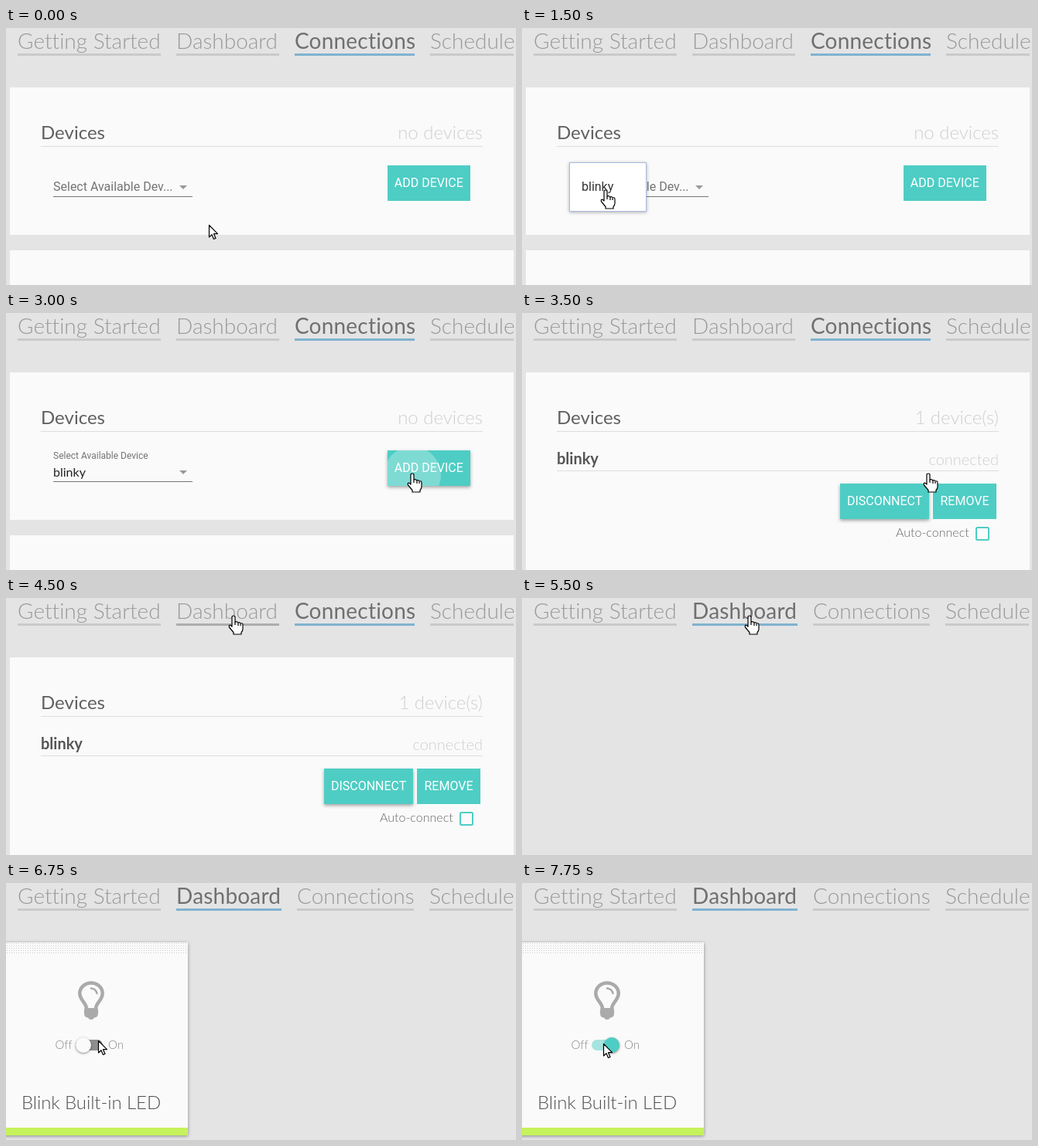
Animation of 659 by 333 pixels, one loop 8 s. Source, as an HTML page:

```html
<!DOCTYPE html>
<html lang="en">
<head>
<meta charset="utf-8">
<style>
  html, body { margin: 0; width: 100%; height: 100%; overflow: hidden; background: #e4e4e4; }
  svg { display: block; width: 659px; height: 333px; font-family: Lato, sans-serif; font-variant-ligatures: none; }
  .thin { font-weight: 300; }
  .nav text { font-size: 28px; font-weight: 300; fill: #999; }
  .nav rect { fill: #cacaca; }
  .nav .on text { font-weight: 400; fill: #707070; letter-spacing: .2px; }
  .nav .on rect { fill: #7fb2d0; }
  .nav .hover rect { fill: #adadad; }
  .roboto { font-family: Roboto, sans-serif; font-size: 16px; }
  .btn text { font: 16px Roboto, sans-serif; fill: #fff; text-anchor: middle; }
  .btn rect { fill: #4ecdc4; }
  .raised rect { filter: drop-shadow(0 2px 2px rgba(0,0,0,.35)); }
  .end { text-anchor: end; font-weight: 300; fill: #cfcfcf; }
  .cursor path { fill: #fff; stroke: #000; stroke-width: 1.2; stroke-linejoin: round; }
</style>
</head>
<body>
<svg viewBox="0 0 659 333">
  <defs>
    <pattern id="dots" width="3" height="3" y="77" patternUnits="userSpaceOnUse">
      <path d="M1 1h1v1h-1z" fill="#cdcdcd"/>
    </pattern>
    <clipPath id="addClip"><rect x="493" y="178" width="107" height="46"/></clipPath>
  </defs>
  <rect width="659" height="333" fill="#e4e4e4"/>
  <g class="nav" id="nav"></g>

  <g id="connections">
    <rect id="panel" x="5" y="77" width="651" fill="#fafafa"/>
    <text x="45" y="144" font-size="24" fill="#606060">Devices</text>
    <text id="count" class="end" x="616" y="144" font-size="24"></text>
    <path d="M45 153.5H616" stroke="#dedede"/>

    <g id="form">
      <rect x="5" y="288" width="651" height="45" fill="#fafafa"/>
      <text id="prompt" class="roboto" x="61" y="211" fill="#757575">Select Available Dev...</text>
      <g id="chosen">
        <text class="roboto" x="61" y="189" style="font-size:12px" fill="#757575">Select Available Device</text>
        <text x="61" y="212" font-size="16" fill="#222">blinky</text>
      </g>
      <path d="M61 218.5H241" stroke="#757575"/>
      <path d="M224 204h10l-5 5z" fill="#999"/>
      <g class="btn" id="add">
        <rect x="493" y="178" width="107" height="46"/>
        <circle id="ripple" cx="525" cy="210" fill="#fff" clip-path="url(#addClip)"/>
        <text x="546.3" y="206">ADD DEVICE</text>
      </g>
      <g id="popup">
        <rect x="61.5" y="174.5" width="99" height="63" fill="#fff" stroke="#a9bbe2"
              style="filter:drop-shadow(0 1px 2px rgba(0,0,0,.3))"/>
        <text class="roboto" x="77" y="211" fill="#333">blinky</text>
      </g>
    </g>

    <g id="device">
      <text x="45" y="196" font-size="20" font-weight="700" fill="#555">blinky</text>
      <text class="end" x="616" y="197" font-size="20">connected</text>
      <path d="M45 204.5H616" stroke="#dedede"/>
      <g class="btn raised">
        <rect x="411" y="221" width="115" height="46"/>
        <text x="468.6" y="249">DISCONNECT</text>
      </g>
      <g class="btn">
        <rect x="531" y="221" width="82" height="46"/>
        <text x="572" y="249">REMOVE</text>
      </g>
      <text class="thin" x="483" y="290" font-size="16" fill="#666">Auto-connect</text>
      <rect x="587" y="278" width="16" height="16" rx="1.5" fill="none" stroke="#4ecdc4" stroke-width="2"/>
    </g>
  </g>

  <g id="card">
    <rect x="-5" y="77" width="240" height="250" fill="#fafafa" style="filter:drop-shadow(0 1px 2px rgba(0,0,0,.4))"/>
    <rect y="77" width="235" height="15" fill="url(#dots)"/>
    <rect y="317" width="235" height="10" fill="#c6f25c"/>
    <g fill="none" stroke="#aaa" stroke-linecap="round">
      <path stroke-width="4.5" d="M104 163C104 155 95.3 152 95.3 143A14.7 13.6 0 0 1 124.7 143C124.7 152 116 155 116 163"/>
      <path stroke-width="2.5" d="M110 136.5Q116 137 117.5 143"/>
      <path fill="#aaa" stroke="none" d="M101.5 162H118.5Q120 167 118.5 172Q117 174.5 114 174.5Q113 177 110 177Q107 177 106 174.5Q103 174.5 101.5 172Q100 167 101.5 162Z"/>
    </g>
    <g class="thin" font-size="15" fill="#888">
      <text x="63.5" y="215">Off</text>
      <text x="132" y="215">On</text>
    </g>
    <rect id="track" x="90" y="203" width="35" height="14" rx="7"/>
    <circle id="thumb" cy="210" r="10" style="filter:drop-shadow(0 1px 1.5px rgba(0,0,0,.45))"/>
    <text class="thin" x="110" y="293" font-size="24" letter-spacing="-.1" text-anchor="middle" fill="#505050">Blink Built-in LED</text>
  </g>

  <g class="cursor" id="cursor">
    <path id="arrow" d="M.5 .5V16L4 12.7L6.5 18.5L9 17.5L6.5 11.7H11.5Z"/>
    <g id="hand">
      <path d="M-4 14V2Q-4 0 -2 0Q0 0 0 2V8Q2.5 7 4 9Q6 8 7 10Q10 9 10 12V17Q10 20 8 21.5V24H-2V21.5L-7.5 15Q-8.5 11 -5.5 12.5Z"/>
      <path d="M0 8V12M4 9V13M7 10.5V13"/>
    </g>
  </g>
</svg>
<script>
const LOOP = 8000, STEP = 250;
const $ = id => document.getElementById(id);
const show = (id, on) => $(id).style.display = on ? '' : 'none';
const set = (id, attrs) => { for (const k in attrs) $(id).setAttribute(k, attrs[k]); };
const between = (t, a, b) => t >= a && t < b;

// time, x, y, hand pointer
const path = [
  [0, 262, 255, 0], [750, 178, 208, 1], [1000, 170, 208, 1], [1500, 110, 210, 1],
  [1750, 110, 210, 1], [2000, 160, 216, 0], [2250, 350, 234, 0], [2500, 510, 212, 1],
  [2750, 527, 208, 1], [3500, 527, 208, 1], [3750, 533, 217, 1], [4000, 470, 160, 0],
  [4250, 350, 66, 0], [4500, 296, 23, 1], [6250, 296, 23, 1], [6500, 200, 125, 0],
  [6750, 119, 204, 0], [7250, 119, 204, 0], [7500, 105, 208, 0], [LOOP, 105, 208, 0]
];

function cursorAt(t) {
  const i = path.findIndex((p, n) => n + 1 < path.length && t < path[n + 1][0]);
  const [a, b] = [path[i], path[i + 1]];
  const f = (t - a[0]) / (b[0] - a[0]);
  return { x: a[1] + (b[1] - a[1]) * f, y: a[2] + (b[2] - a[2]) * f, hand: a[3] };
}

const tabs = ['Getting Started', 'Dashboard', 'Connections', 'Schedule'];
$('nav').innerHTML = tabs.map(s => `<g><text y="27">${s}</text><rect y="33" height="3"/></g>`).join('');

function drawNav(active, hover) {
  const spans = active === 1
    ? [[15, 200], [220, 356], [376, 527], [547, 655]]
    : [[15, 200], [220, 353], [373, 528], [548, 656]];
  [...$('nav').children].forEach((g, i) => {
    const [x, end] = spans[i], [label, line] = g.children;
    g.setAttribute('class', i === active ? 'on' : i === hover ? 'hover' : '');
    label.setAttribute('x', x);
    line.setAttribute('x', x);
    line.setAttribute('width', end - x);
  });
}

function draw(t) {
  const dash = t >= 5500, added = t >= 3500, picked = t >= 2000;
  drawNav(dash ? 1 : 2, t >= 4500 ? 1 : -1);

  show('connections', !dash);
  set('panel', { height: added ? 256 : 191 });
  $('count').textContent = added ? '1 device(s)' : 'no devices';
  show('form', !added);
  show('device', added);
  show('prompt', !picked);
  show('chosen', picked);
  show('popup', between(t, 1250, 2000));
  set('add', { class: between(t, 2500, 3500) ? 'btn raised' : 'btn' });
  show('ripple', between(t, 2750, 3500));
  set('ripple', { r: Math.max(0, 8 + 29 * (t - 2750) / STEP), opacity: t < 3250 ? .27 : .14 });

  show('card', dash);
  set('card', { opacity: Math.min(1, Math.max(0, (t - 5500) / 500)) });
  const lit = t >= 7000 && !between(t, 7500, 7750);
  set('track', { fill: lit ? '#a6e4df' : '#8e8e8e' });
  set('thumb', { cx: lit ? 116 : 100, fill: lit ? '#4ecdc4' : '#fafafa' });

  const c = cursorAt(t);
  set('cursor', { transform: `translate(${Math.round(c.x)} ${Math.round(c.y)})` });
  show('hand', c.hand);
  show('arrow', !c.hand);
}

const start = performance.now();
function tick() {
  const t = (performance.now() - start) % LOOP;
  draw(Math.floor(t / STEP) * STEP);
  requestAnimationFrame(tick);
}
tick();
</script>
</body>
</html>
```
